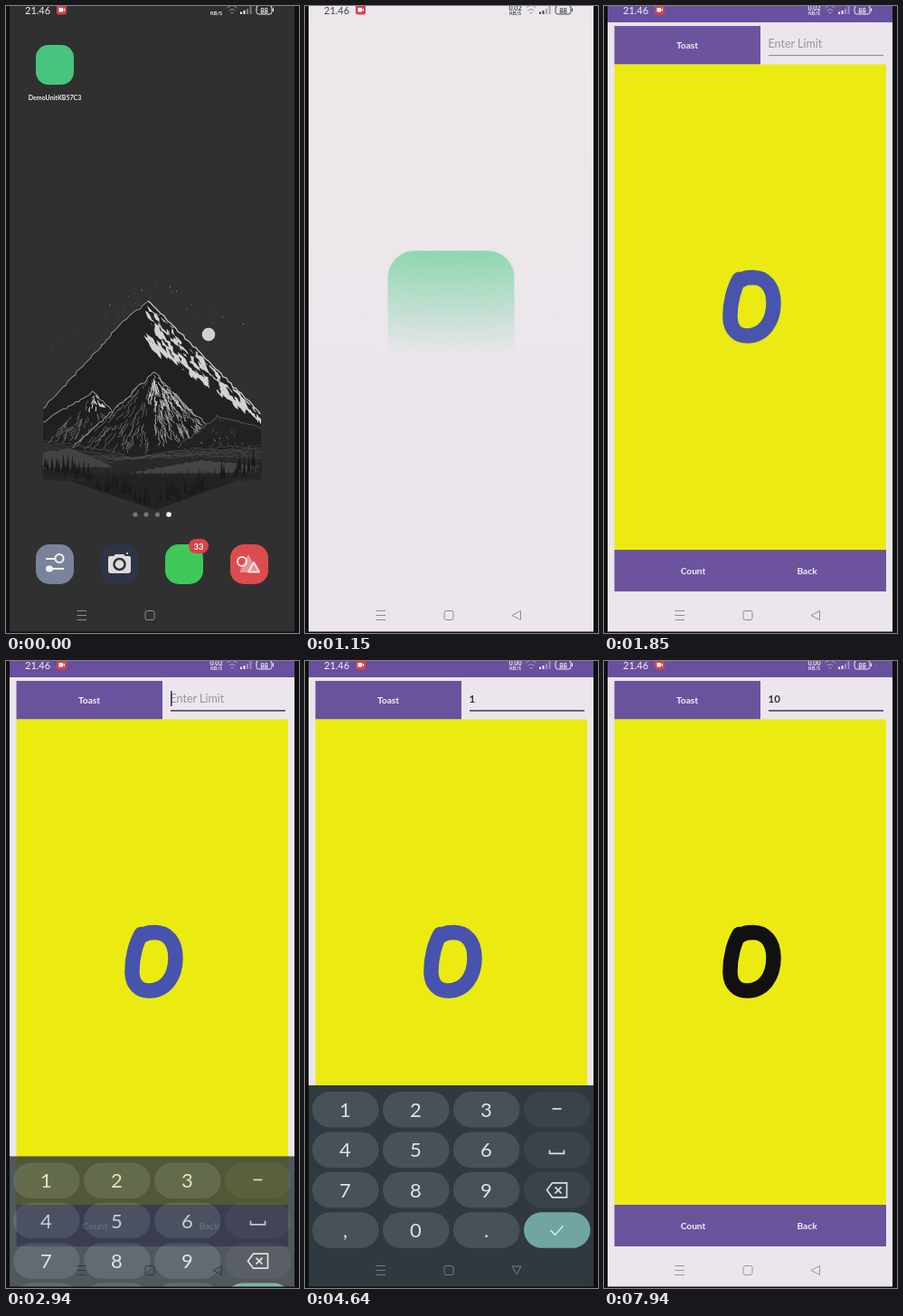
These frames come from a looping animation (324 px wide and 693 px high, 8000 ms). An HTML page with a canvas:

```html
<!DOCTYPE html>
<html lang="en">
<head>
<meta charset="utf-8">
<title>Counter app demo</title>
<style>
  html, body { margin: 0; width: 100%; height: 100%; overflow: hidden; background: #0e0e0e; }
  #stage { position: absolute; left: 0; top: 0; width: 324px; height: 693px; overflow: hidden; background: #313030; }
  .layer { position: absolute; left: 0; top: 0; width: 324px; height: 693px; display: block; overflow: visible; }
  text { font-family: Lato, "Open Sans", sans-serif; }
  .mid { text-anchor: middle; }
  #card { position: absolute; transform: translate(-50%, -50%); background: #ece8eb; }
  #logo { position: absolute; left: 50%; top: 50%; width: 44.6%; aspect-ratio: 1; border-radius: 21%;
          transform: translate(-50%, -50%); background: #46cb83; }
  #wipe { height: 1500px; background: radial-gradient(circle at 162px 0, #ece6ec00 535px, #ece6ec 740px); }
</style>
</head>
<body>
<div id="stage">
  <canvas id="wall" class="layer" width="648" height="1386"></canvas>

  <svg id="home" class="layer" viewBox="0 0 324 693">
    <rect x="33" y="43" width="42" height="44" rx="14" fill="#46c57d"/>
    <text class="mid" x="54" y="104" font-size="7" font-weight="700" fill="#f2f2f2">DemoUnitKB57C3</text>
    <g fill="#777">
      <circle cx="143" cy="562" r="2.6"/><circle cx="155" cy="562" r="2.6"/><circle cx="167.500" cy="562" r="2.6"/>
      <circle cx="180" cy="562" r="2.8" fill="#fff"/>
    </g>
    <rect x="33" y="595" width="42" height="44" rx="15" fill="#79839a"/>
    <g fill="none" stroke="#f0efec" stroke-width="2">
      <path d="M44 611H54M52 622H64"/><circle cx="59" cy="610.500" r="4.500"/>
      <rect x="45" y="619.500" width="6" height="5" rx="2.500" fill="#f0efec"/>
    </g>
    <rect x="104" y="595" width="42" height="44" rx="15" fill="#2d3446"/>
    <path d="M115 608H119L121 606H130L132 608H136Q138 608 138 610V624Q138 627 135 627H116Q113 627 113 624V610Q113 608 115 608Z" fill="#dedcd8"/>
    <circle cx="125.500" cy="617" r="6" fill="#dedcd8" stroke="#2d3446" stroke-width="2.500"/>
    <circle cx="134" cy="605" r="1" fill="#fff"/>
    <rect x="176" y="595" width="42" height="44" rx="15" fill="#3fc95a"/>
    <rect x="202" y="589" width="22" height="16" rx="8" fill="#dc4148"/>
    <text class="mid" x="213" y="600.500" font-size="9.500" font-weight="700" fill="#fff">33</text>
    <rect x="248" y="595" width="42" height="44" rx="15" fill="#dc4c4e"/>
    <path d="M258 626L268 606L279 626Z" fill="#ec9492"/>
    <g fill="none" stroke="#f7e9e4" stroke-width="2" stroke-linejoin="round">
      <circle cx="261" cy="614" r="5"/><path d="M268 625.500L274 615L280 625.500Z"/>
    </g>
  </svg>

  <svg id="app" class="layer" viewBox="0 0 324 693">
    <rect y="-10" width="324" height="715" fill="#ece6ec"/>
    <rect y="-10" width="324" height="28" fill="#684f9f"/>
    <g fill="#6a539d">
      <rect x="11.500" y="22" width="161.500" height="42.500"/>
      <rect x="11.500" y="601" width="300.500" height="46"/>
    </g>
    <rect x="11.500" y="64.500" width="300.500" height="536.500" fill="#ebeb12"/>
    <g class="mid" fill="#f4f0f8" font-size="10.200" font-weight="700">
      <text x="92" y="47">Toast</text><text x="98.500" y="628">Count</text><text x="224.500" y="628">Back</text>
    </g>
    <text id="hint" x="181.500" y="45.500" font-size="12.500" fill="#99939d">Enter Limit</text>
    <g font-size="11.500" font-weight="700" fill="#343036">
      <text id="one" x="181.500" y="45.500">1</text><text id="ten" x="181.500" y="45.500">10</text>
    </g>
    <rect id="thin" x="182" y="54" width="127" height="1" fill="#8a848e"/>
    <rect id="thick" x="182" y="54" width="127" height="1.800" fill="#5d5665"/>
    <rect id="caret" x="182" y="33" width="1.600" height="17" fill="#443c50"/>
    <path id="digit" role="img" aria-label="0" fill="none" stroke="#4853ad" stroke-width="16.500" stroke-linecap="round" stroke-linejoin="round"
      d="M149.500 302C144 311 139 328 139.500 345C140 358 148 364.500 158 364.500C177 364.500 187.500 348 187.500 328C187.500 310 178 300 165 300C159 300 156 300 152 303"/>
  </svg>

  <div id="card"><div id="logo"></div></div>
  <div id="wipe" class="layer"></div>

  <svg id="keys" class="layer" viewBox="0 0 324 693">
    <rect y="469" width="324" height="230" fill="#30393f"/>
  </svg>

  <svg id="status" class="layer" viewBox="0 0 324 693">
    <g fill="currentColor">
      <text x="21" y="9" font-size="11">21.46</text>
      <g class="mid" font-weight="700">
        <g font-size="7.200"><text id="slow" x="232.500" y="4.500">0.00</text><text id="fast" x="232.500" y="4.500">0.02</text></g>
        <text x="232.500" y="10" font-size="5.500">KB/S</text>
        <text x="285.500" y="7.500" font-size="7.500">88</text>
      </g>
      <path d="M259 9V6.500H261V9ZM262.500 9V5H264.500V9Z"/>
      <path d="M266 9V3H268V9ZM269.500 9V0H271.500V9Z" opacity=".4"/>
    </g>
    <g fill="none" stroke="currentColor">
      <rect x="277" y="-.5" width="17" height="9.500" rx="2.500"/><path d="M295.500 2.500V6"/>
      <path d="M244.500 2Q250 -3 255.500 2M246.500 5Q250 2 253.500 5M248.500 8Q250 6.500 251.500 8" opacity=".5"/>
    </g>
    <rect x="56" y="-2" width="11" height="11.500" rx="2.500" fill="#d5434b"/>
    <path d="M58.500 2H63V6.500H58.500ZM63 4.200L65 2.500V6Z" fill="#fff"/>
  </svg>

  <svg id="nav" class="layer" viewBox="0 0 324 693" fill="none" stroke="currentColor">
    <path d="M78.500 668.500H89M78.500 673.500H89M78.500 678.500H89"/>
    <rect x="154" y="668.500" width="10" height="10" rx="2"/>
    <path id="back" d="M238.500 668.500V678.500L229 673.500Z" stroke-linejoin="round"/>
    <path id="down" d="M229 669H239L234 678Z" stroke-linejoin="round"/>
  </svg>

  <svg class="layer" viewBox="0 0 324 693" fill="#0f0f0f">
    <rect width="4" height="693"/><rect x="319" width="5" height="693"/><rect y="691.500" width="324" height="2"/>
  </svg>
</div>

<script>
const $ = id => document.getElementById(id);

// ---------- wallpaper ----------
const ctx = $('wall').getContext('2d');
ctx.scale(2, 2);
let seed = 4711;
const rand = () => (seed = seed * 16807 % 2147483647) / 2147483647;
const mix = (a, b, u) => [a[0] + (b[0] - a[0]) * u, a[1] + (b[1] - a[1]) * u];
const times = (n, fn) => { for (let i = 0; i < n; i++) fn(i); };

// Jagged path through a few points
function trace(pts, amp) {
  ctx.beginPath();
  ctx.moveTo(...pts[0]);
  pts.slice(1).forEach((b, i) => {
    const a = pts[i], n = Math.ceil(Math.hypot(b[0] - a[0], b[1] - a[1]) / 4);
    times(n, k => {
      const [x, y] = mix(a, b, (k + 1) / n);
      ctx.lineTo(x + (rand() - .5) * amp, y + (rand() - .5) * amp);
    });
  });
}
function fill(pts, color, amp = 0) {
  trace(pts, amp);
  ctx.fillStyle = color;
  ctx.fill();
}
function line(pts, color, w = .7, amp = 2) {
  trace(pts, amp);
  ctx.strokeStyle = color;
  ctx.lineWidth = w;
  ctx.stroke();
}
// Strokes running down a slope, brighter ones first cut short near the peak
function face(peak, left, right, n, color, w, reach = .9) {
  times(n, () => {
    const foot = mix(left, right, rand()), v = Math.sqrt(rand()) * reach;
    line([mix(peak, foot, v), mix(peak, foot, v + .06 + .12 * rand())], color, w, 3);
  });
}
function mountain(left, peak, right, color, edge) {
  fill([left, peak, right], color, 3);
  line([left, peak, right], edge, .8, 3);
}
// Slanted splinters below the ridge, thinning out downhill
function shards(n, from, to, color, size) {
  times(n, () => {
    const u = rand(), depth = rand() * 42 * (1 - u) + 2, s = size * (.5 + rand());
    const [x, y] = mix(from, to, u), px = x - depth * .35, py = y + depth * .75;
    fill([[px, py], [px + s * .75, py + s * .65], [px + s * .85, py + s * 1.2], [px + s * .2, py + s * .5]], color, 2);
  });
}

function drawWall() {
  ctx.fillStyle = '#313030';
  ctx.fillRect(0, 0, 324, 693);

  times(28, () => {
    const x = 50 + rand() * 220;
    ctx.fillStyle = rand() < .4 ? '#aaa' : '#666';
    ctx.fillRect(x, 304 + Math.abs(x - 165) * .5 + rand() * 20 - 4, 1, 1);
  });
  ctx.beginPath();
  ctx.arc(224, 363, 7.2, 0, 7);
  ctx.fillStyle = '#d2d1d0';
  ctx.fill();

  const top = [157, 326], west = [41, 445], east = [282, 451];
  fill([west, [104, 378], [125, 353], top, east, [282, 515], [165, 557], [41, 515]], '#212121');
  line([west, [104, 378], [125, 353], top], '#a5a5a5', .8, 2.5);
  ctx.save();
  trace([top, east, [282, 515], [140, 515], [148, 352], top], 0);
  ctx.clip();
  shards(95, top, east, '#d3d2d1', 13);
  shards(45, top, east, '#232323', 10);
  ctx.restore();
  line([top, east], '#d0d0d0', 1.2);

  const small = [96, 427], front = [163, 405], rear = [234, 453];
  mountain([41, 460], small, [145, 472], '#1f1f1f', '#aaa');
  face(small, [44, 484], [130, 482], 60, '#777', .6);
  face(small, [88, 460], [125, 460], 16, '#dadada', 1, .5);

  mountain([72, 490], front, [238, 480], '#1e1e1e', '#b0b0b0');
  face(front, [72, 490], [158, 495], 80, '#777', .6);
  face(front, [165, 490], [234, 476], 110, '#a8a8a8', .7);
  face(front, [150, 480], [225, 470], 45, '#cfcfcf', .8, .5);

  mountain([190, 488], rear, [282, 466], '#232323', '#5a5a5a');
  face(rear, [205, 492], [280, 492], 22, '#505050', .6);

  fill([[41, 482], [130, 498], [282, 488], [282, 525], [41, 525]], '#292929', 2);
  times(8, i => line([[41, 480 + i * 3], [85 + rand() * 40, 490 + i * 2], [140, 500], [180 + rand() * 60, 490 + i], [282, 486 + i * 2]], '#4a4a4a', .6, 3));
  fill([[41, 494], [70, 488], [118, 509], [41, 512]], '#434343', 2);
  fill([[132, 517], [215, 502], [282, 508], [282, 516]], '#454545', 2);

  // Forest tapering to a point, trees above and their tips below
  for (let x = 41; x < 283; x += 2.5) {
    const low = 555 - Math.abs(x - 163) * .35 + rand() * 10 - 5;
    fill([[x - 2, 524], [x, 518 - rand() * 8], [x + 2, 524], [x + 2, low - 8], [x, low], [x - 2, low - 8]], '#222');
    if (rand() < .5) fill([[x - 2, low - 4], [x, low - 14 - rand() * 12], [x + 2, low - 4]], '#191919');
  }
}
drawWall();

// ---------- keyboard ----------
function add(tag, attrs, text = '') {
  const el = document.createElementNS('http://www.w3.org/2000/svg', tag);
  for (const k in attrs) el.setAttribute(k, attrs[k]);
  el.textContent = text;
  $('keys').append(el);
}
const GLYPHS = {
  '-': 'M-5 -1h10',
  '_': 'M-8 0v4h16v-4',
  '<': 'M-11 0l6 -8h16v16h-16zM-2 -3.500l7 7m0 -7l-7 7',
  '+': 'M-7 0l5 5l9 -10'
};
['123-', '456_', '789<', ',0.+'].forEach((row, r) => [...row].forEach((ch, c) => {
  const x = 8 + c * 78, y = 476 + r * 44.4, mx = x + 36.5, my = y + 20;
  add('rect', { x, y, width: 73.5, height: 39.5, rx: 19.7, fill: ch === '+' ? '#70a6a1' : c === 3 ? '#3a4348' : '#475156' });
  if (GLYPHS[ch]) add('path', { d: GLYPHS[ch], transform: `translate(${mx} ${my})`, fill: 'none', stroke: '#d8dfdf', 'stroke-width': 1.7 });
  else add('text', { class: 'mid', x: mx, y: my + 8, 'font-size': 22, fill: '#dfe5e4' }, ch);
}));

// ---------- timeline ----------
const LOOP = 8000;
const HOLD = 'steps(1, end)';
const QUAD_IN = 'cubic-bezier(.333, 0, .667, .333)';
const QUAD_OUT = 'cubic-bezier(.333, .667, .667, 1)';
const CUBIC_OUT = 'cubic-bezier(.333, 1, .667, 1)';

// Rows are [time, value, easing towards the next row]
function play(id, prop, rows, ease = 'linear') {
  rows = [[0, rows[0][1]], ...rows, [LOOP, rows[rows.length - 1][1]]];
  $(id).animate(rows.map(([t, v, easing = ease]) => ({ offset: t / LOOP, [prop]: v, easing })),
    { duration: LOOP, iterations: Infinity });
}
const tween = (id, prop, t0, t1, from, to, ease) => play(id, prop, [[t0, from], [t1, to]], ease);
const show = (id, ...spans) =>
  play(id, 'opacity', [[0, 0], ...spans.flatMap(([a, b]) => [[a, 1], [b, 0]])], HOLD);
const down = y => `translateY(${y}px)`;

const T = { open: 640, reveal: 1150, ready: 1920, focus: 2730, keys: 2820, one: 4130, zero: 5430, close: 5940 };

// The launch window grows out of the icon, then fades to reveal the app
tween('card', 'left', T.open, 820, '54px', '161.5px', CUBIC_OUT);
tween('card', 'top', T.open, 820, '65px', '341px', CUBIC_OUT);
tween('card', 'width', T.open, 940, '42px', '316px', CUBIC_OUT);
tween('card', 'height', T.open, 940, '44px', '704px', CUBIC_OUT);
tween('card', 'borderRadius', T.open, 940, '50px', '0px');
play('card', 'opacity', [[T.open, 0], [856, 1], [T.reveal, 1, QUAD_OUT], [T.ready, 0]]);
tween('logo', 'opacity', T.reveal, 1360, 1, 0);

show('app', [T.reveal, LOOP]);
tween('app', 'transform', T.reveal, T.ready, down(6), down(0), QUAD_OUT);
show('wipe', [T.reveal, T.ready]);
tween('wipe', 'transform', T.reveal, T.ready, down(-353), down(240), QUAD_OUT);

play('status', 'color', [[T.open, '#f2f2f2'], [860, '#4a4652'], [1430, '#4a4652'], [1710, '#f2eef8']]);
play('nav', 'color', [[0, '#8c8c8c'], [T.focus, '#8f8b97'], [2940, '#343b40'], [3080, '#727c82'], [T.close, '#727c82'], [6420, '#9a95a6']]);
show('back', [0, 3080], [6210, LOOP]);
show('down', [3080, 6210]);
show('slow', [0, 260], [T.one, LOOP]);
show('fast', [260, T.one]);

play('keys', 'transform', [[T.keys, down(224), CUBIC_OUT], [3230, down(0)], [T.close, down(0), QUAD_IN], [6420, down(155)]]);
play('keys', 'opacity', [[T.keys, 0], [2966, 1], [T.close, 1], [6420, 0]]);

show('hint', [0, T.one]);
show('one', [T.one, T.zero]);
show('ten', [T.zero, LOOP]);
show('thin', [0, T.focus]);
show('thick', [T.focus, LOOP]);

// The caret blinks twice a cycle and starts over with each key
const blinks = [];
[T.focus, T.one, T.zero, LOOP].forEach((end, i, all) => {
  for (let t = all[i - 1]; t < end; t += 1000) blinks.push([t, Math.min(t + 500, end)]);
});
show('caret', ...blinks);
play('caret', 'transform', [[0, 'none'], [T.one, 'translateX(6px)'], [T.zero, 'translateX(13px)']], HOLD);
play('digit', 'stroke', [[0, '#4853ad'], [7410, '#2b3066'], [7480, '#111']], HOLD);
</script>
</body>
</html>
```
